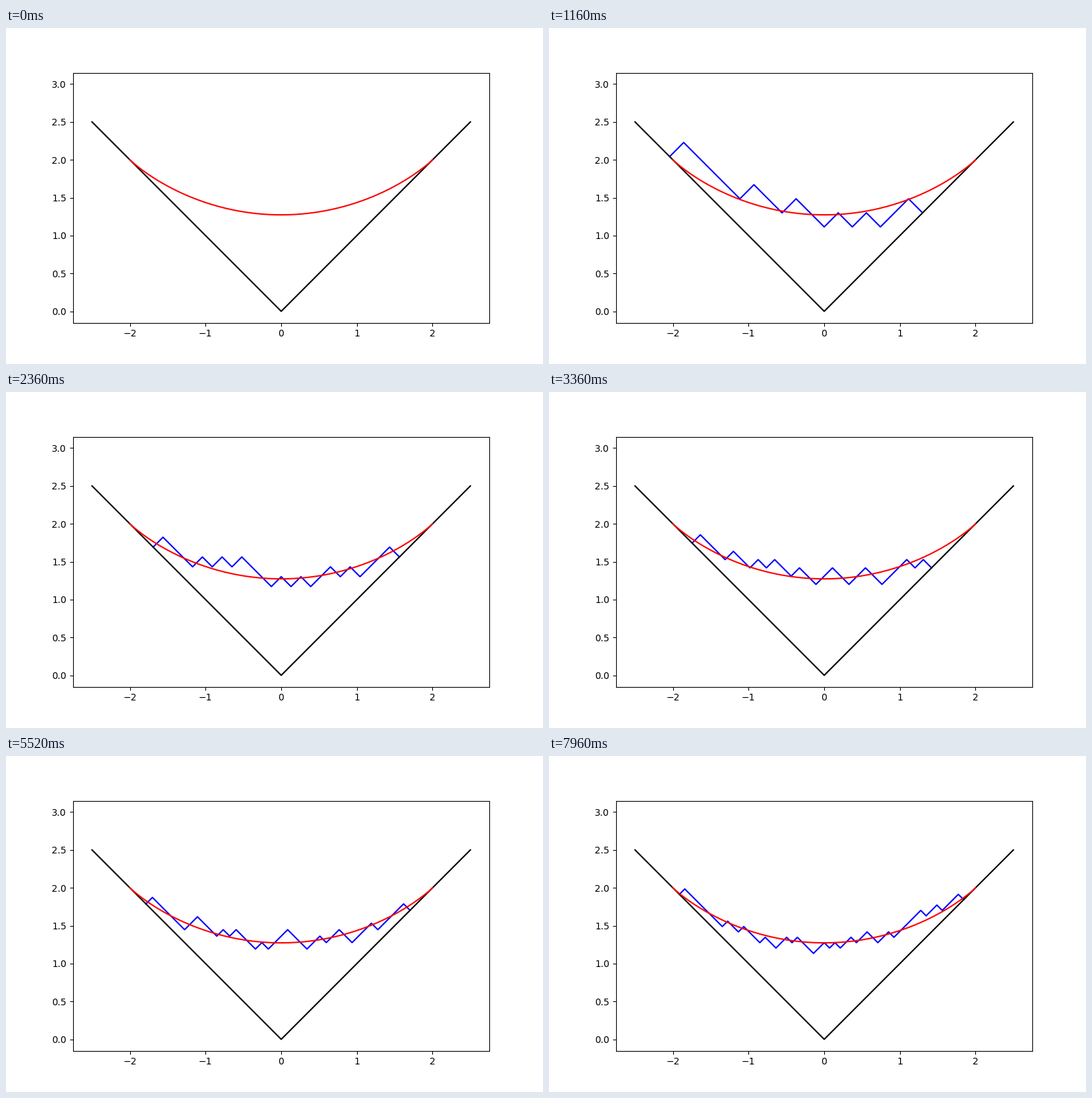
These frames come from a looping animation (800x500 px, 8 s). A matplotlib script:

```python
import random

import matplotlib.pyplot as plt
import numpy as np
from matplotlib.animation import FuncAnimation

FRAMES = 200
INTERVAL = 40

# Row lengths of the finished Young diagram, 200 boxes in all
FINISHED = [26, 23, 21, 16, 14, 14, 12, 10, 9, 7, 7, 7, 6, 4, 4,
            3, 3, 3, 2, 2] + [1] * 7


def limit(x):
    """Limit shape of random Young diagrams; equals |x| outside [-2, 2]."""
    s = np.clip(x, -2, 2)
    return 2 / np.pi * (x * np.arcsin(s / 2) + np.sqrt(4 - s * s))


def growth_order():
    """Boxes (row, column) in the order in which they are added."""
    rng = random.Random(7)
    size = np.arange(0.5, 500, 0.1)
    root = np.sqrt(size)
    when = {}
    for r, length in enumerate(FINISHED):
        for c in range(length):
            # Size at which the scaled limit shape reaches the box centre
            reach = root * limit((c - r) / root) >= r + c + 1
            n = size[np.argmax(reach)]
            # The left side runs ahead at first, then the right catches up
            lean = 0.7 * np.exp(-n / 60) * (c - r) / (r + c + 3)
            n *= np.exp(lean) * rng.uniform(0.88, 1.15)
            # A box waits for its neighbours above and to the left
            when[r, c] = max(n, when.get((r - 1, c), 0), when.get((r, c - 1), 0))
    return sorted(when, key=lambda box: (when[box], box))


def profile(rows):
    """Upper boundary of the diagram, turned by 45 degrees."""
    x, y = -len(rows), len(rows)
    points = [(x, y)]
    last = 0
    for length in reversed(rows):
        rise = length - last
        if rise:
            x, y = x + rise, y + rise
            points.append((x, y))
        x, y = x + 1, y - 1
        points.append((x, y))
        last = length
    return np.array(points).T


order = growth_order()

fig, ax = plt.subplots(figsize=(8, 5), dpi=100)
ax.set_aspect("equal")
ax.set_xlim(-2.75, 2.75)
ax.set_ylim(-0.15, 3.15)
ax.set_xticks(range(-2, 3))
ax.set_yticks(np.arange(0, 3.1, 0.5))

border, = ax.plot([], [], color="blue")
ax.plot([-2.5, 0, 2.5], [2.5, 0, 2.5], color="black")
x = np.linspace(-2, 2, 401)
ax.plot(x, limit(x), color="red")


def update(step):
    if step == 0:
        border.set_data([], [])
    else:
        filled = [r for r, c in order[:step + 1]]
        rows = [filled.count(r) for r in range(max(filled) + 1)]
        border.set_data(*(profile(rows) / np.sqrt(step)))
    return border,


anim = FuncAnimation(fig, update, frames=FRAMES, interval=INTERVAL,
                     repeat=True, repeat_delay=0)
plt.show()
```
